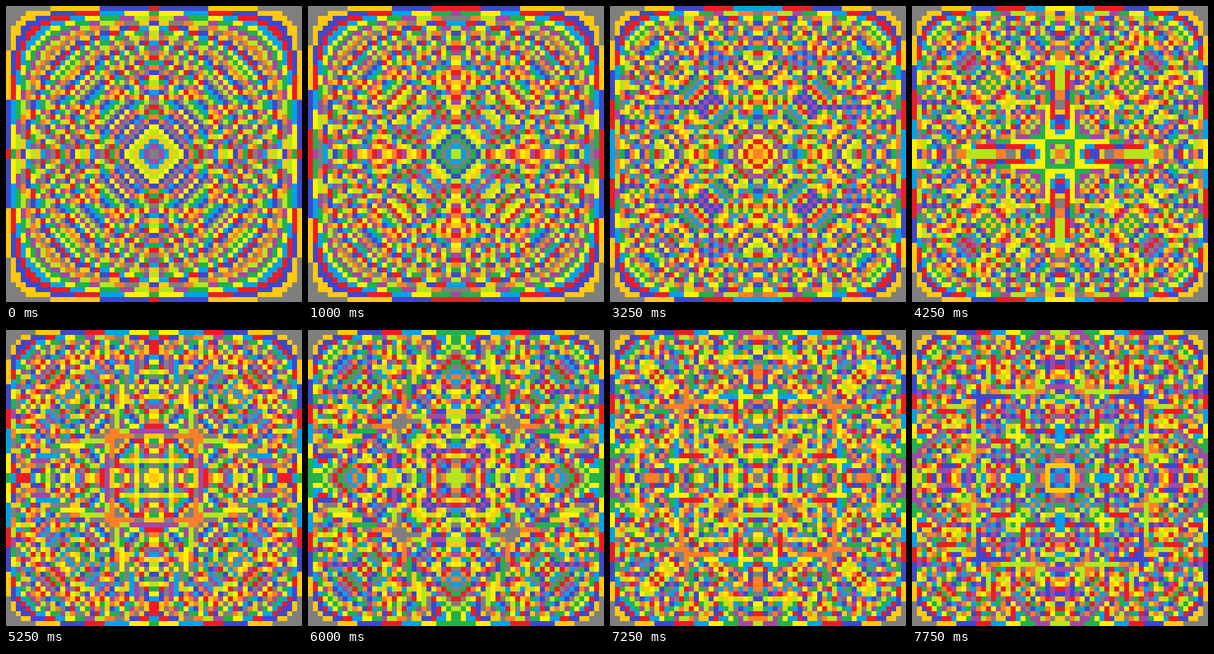
An HTML page with a canvas that plays this animation: 480 px wide and 480 px high, repeating every 8000 ms.

```html
<!DOCTYPE html>
<html lang="en">
<head>
<meta charset="utf-8">
<title>Power table</title>
<style>
  html, body { margin: 0; width: 100%; height: 100%; overflow: hidden; background: #7f7f7f; }
  canvas { display: block; width: 480px; height: 480px; }
</style>
</head>
<body>
<canvas id="stage" width="480" height="480"></canvas>
<script>
  const LOOP = 8000, STEP = 250;
  const HALF = 30, CELL = 8, LAST = 2 * HALF - 1;
  // One colour per tens digit, 0 to 9
  const COLORS = ['#7f7f7f', '#ffc90e', '#3f48cc', '#ed1c24', '#00a2e8',
                  '#fff200', '#22b14c', '#a349a4', '#b5e61d', '#ff7f27'];
  const ctx = document.getElementById('stage').getContext('2d');

  const cell = (x, y) => ctx.fillRect(x * CELL, y * CELL, CELL, CELL);

  // Fill a cell and its mirror images in the other quadrants
  function mirrored(x, y) {
    for (const cx of [x, LAST - x]) {
      cell(cx, y);
      cell(cx, LAST - y);
    }
  }

  // Multiplication table raised to a slowly growing power
  function draw(step) {
    const power = 1 + step / 99;
    for (let y = 0; y < HALF; y++) {
      for (let x = 0; x < HALF; x++) {
        const value = Math.round(Math.pow((x + 1) * (y + 1), power));
        ctx.fillStyle = COLORS[Math.floor(value / 10) % 10];
        mirrored(x, y);
      }
    }
  }

  let shown = -1;
  function tick() {
    const step = Math.floor(((performance.now() - start) % LOOP) / STEP);
    if (step !== shown) draw(shown = step);
    requestAnimationFrame(tick);
  }

  const start = performance.now();
  tick();
</script>
</body>
</html>
```
